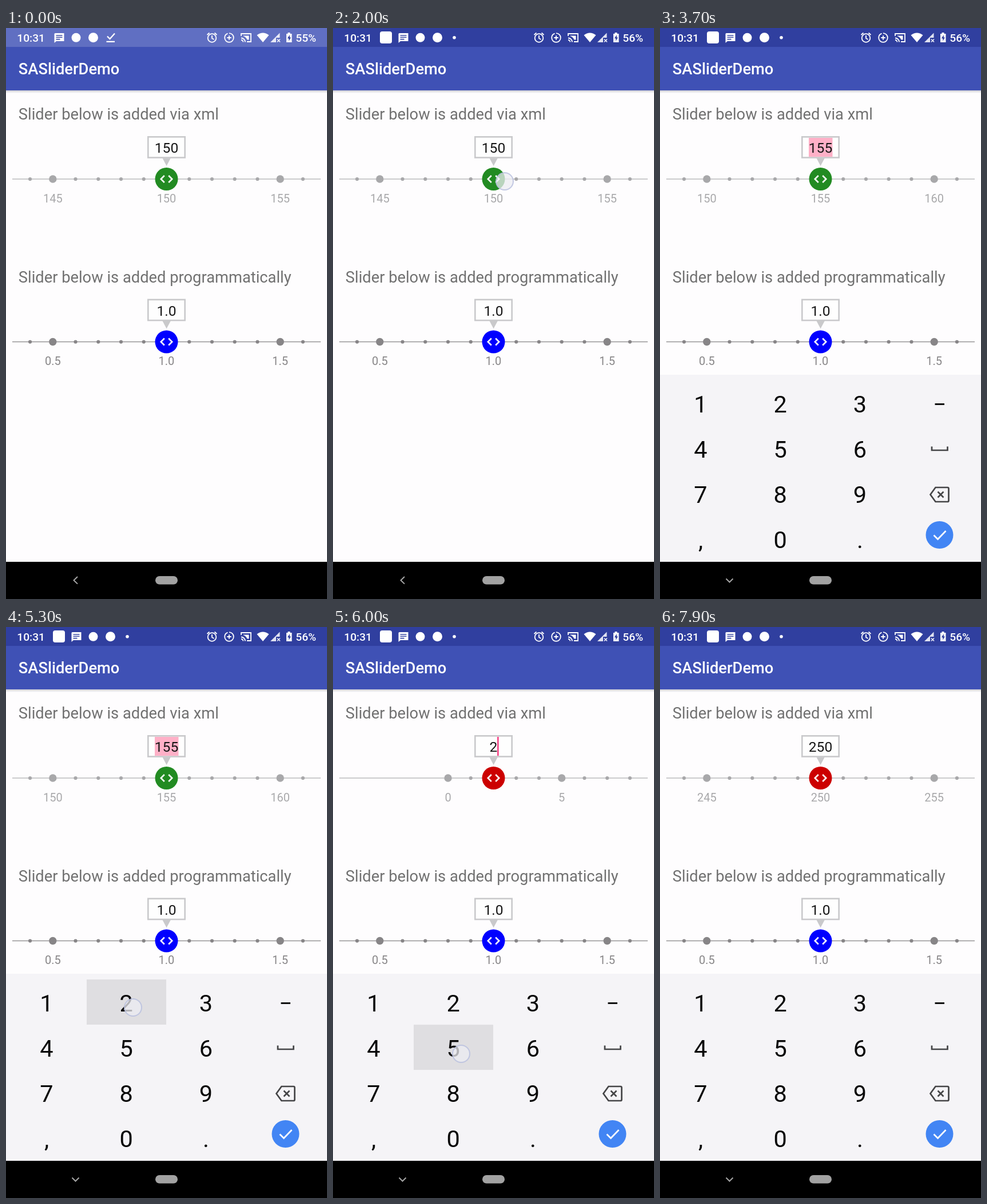
Recreate the animation shown at these times as an HTML page. Size 561 by 998 pixels, loop 8 s.

```html
<!DOCTYPE html>
<html lang="en">
<head>
<meta charset="utf-8">
<title>SASliderDemo</title>
<style>
  html, body { margin: 0; width: 100%; height: 100%; overflow: hidden; background: #fefdfe; }
  svg { display: block; width: 100%; height: 100%; }
  text { font-family: Roboto, sans-serif; white-space: pre; }
  .mid { text-anchor: middle; }
  .status { font-size: 19.2px; font-weight: 500; fill: #fff; }
  .title { font-size: 27.3px; font-weight: 500; fill: #fff; }
  .head { font-size: 27.3px; fill: #717171; }
  .label { font-size: 20px; }
  .value { font-size: 24.6px; fill: #161616; }
  .key { font-size: 41.5px; fill: #080808; }
  .line { fill: none; stroke: #fff; stroke-width: 1.8; }
</style>
</head>
<body>
<svg viewBox="0 0 561 998" preserveAspectRatio="none">
  <defs>
    <linearGradient id="shade" x2="0" y2="1">
      <stop stop-color="#cfcfd4"/><stop offset="1" stop-color="#fefdfe"/>
    </linearGradient>
    <clipPath id="track"><rect x="11" y="-80" width="539" height="130"/></clipPath>
    <clipPath id="screen"><rect width="561" height="933"/></clipPath>
  </defs>
  <rect width="561" height="998" fill="#fefdfe"/>
  <rect y="109" width="561" height="5" fill="url(#shade)"/>
  <rect y="32" width="561" height="77" fill="#3f51b5"/>
  <rect width="561" height="33" fill="#303f9f"/>
  <rect id="glow" width="561" height="33" fill="#606fc2"/>
  <text class="title" x="21.8" y="81">SASliderDemo</text>

  <text class="status" x="19.3" y="24">10:31</text>
  <rect id="note" x="82" y="6" width="21" height="21" rx="4" fill="#fff"/>
  <g id="icons">
    <path d="M86 9H101.500V23H88L84.500 26V10.500Q84.500 9 86 9Z" fill="#fff"/>
    <path d="M87.500 13H98.500M87.500 16.300H98.500M87.500 19.600H94.500" stroke="#3a49a5" stroke-width="1.6"/>
    <circle cx="122.500" cy="16.800" r="8" fill="#fff"/>
    <circle cx="152.500" cy="16.800" r="8.500" fill="#fff"/>
  </g>
  <path id="done" d="M177 14.500L181.500 19L190 9.500M175.500 23.800H190" class="line" style="stroke-width:2.3"/>
  <circle id="more" cx="212" cy="16.700" r="2.800" fill="#fff"/>

  <g class="line">
    <circle cx="360" cy="17.500" r="7.300"/>
    <path d="M360 13V18L363.500 20M351.500 12L355.500 8.500M368.500 12L364.500 8.500"/>
    <circle cx="390" cy="17" r="7.800" stroke-dasharray="34 2.500"/>
    <path d="M390 13.300V20.700M386.300 17H393.700"/>
    <path d="M411 14V10H428V24H421M411 17.500A7 7 0 0 1 418 24.500M411 21A3.500 3.500 0 0 1 414.500 24.500"/>
    <path d="M414.500 13.500H424.500V20.500H421.500Q419.500 15.500 414.500 14Z" fill="#fff" stroke="none"/>
  </g>
  <path d="M438.500 12.500Q449 4.500 459.500 12.500L449 25Z" fill="#fff"/>
  <path d="M462 25L478.500 8.500V17H472V25Z" fill="#fff" opacity=".85"/>
  <path d="M474 19.500L479 24.500M479 19.500L474 24.500" class="line" style="stroke-width:1.500"/>
  <path d="M490 10H492.500V8H496.500V10H499.500V25H490Z" fill="#fff"/>
  <path d="M495.800 12L491.800 18.200H494.300V22.800L498 16.600H495.800Z" fill="#303f9f"/>
  <text class="status" id="battery" x="506.300" y="24"></text>

  <text class="head" x="21.800" y="160">Slider below is added via xml</text>
  <text class="head" x="21.800" y="444.500">Slider below is added programmatically</text>
  <g id="top" transform="translate(0 264)"></g>
  <g id="low" transform="translate(0 548.500)"></g>

  <g clip-path="url(#screen)">
    <g id="board">
      <rect y="606" width="561" height="327" fill="#f5f4f7"/>
      <rect id="press" x="141" width="139" height="79" fill="#dfdee1"/>
      <g id="keys"></g>
      <rect x="480.500" y="656" width="16.500" height="3" fill="#111"/>
      <g fill="none" stroke="#454547" stroke-width="2.700">
        <path d="M475 731.500V738H502.500V731.500"/>
        <path d="M481.500 803H502.500Q504.500 803 504.500 805V826Q504.500 828 502.500 828H481.500L472.500 815.500Z"/>
        <path d="M485.500 810.500L495.500 820.500M495.500 810.500L485.500 820.500"/>
      </g>
      <circle cx="488.500" cy="886" r="24" fill="#4285f4"/>
      <path d="M478.500 886.500L485.500 893.500L499.500 879" class="line" style="stroke-width:2.700"/>
    </g>
  </g>

  <rect y="933" width="561" height="65" fill="#000"/>
  <path id="back" fill="none" stroke="#a6a6a6" stroke-width="2"/>
  <rect x="261" y="958" width="39" height="14.500" rx="7.200" fill="#a2a2a2"/>
  <circle id="touch" r="15" fill="#ececf1" fill-opacity=".75" stroke="#b9c0de" stroke-opacity=".85" stroke-width="2"/>
</svg>
<script>
const LOOP = 8000, STEP = 100, MID = 280.5, GAP = 39.74;
const $ = id => document.getElementById(id);
const show = (el, on) => el.setAttribute('visibility', on ? 'visible' : 'hidden');
const clamp = x => Math.max(0, Math.min(1, x));
const smooth = x => (1 - Math.cos(Math.PI * clamp(x))) / 2;
const within = (t, a, b) => t >= a && t < b;

function add(parent, tag, attrs, text) {
  const el = document.createElementNS('http://www.w3.org/2000/svg', tag);
  for (const k in attrs) el.setAttribute(k, attrs[k]);
  if (text !== undefined) el.textContent = text;
  parent.appendChild(el);
  return el;
}

// Local y = 0 is the track line; one tick is one unit of "pos".
function makeSlider(root, dot, line, width, format) {
  add(root, 'rect', { x: 11, y: -width / 2, width: 539, height: width, fill: line });
  const ticks = add(root, 'g', { 'clip-path': 'url(#track)' });
  add(root, 'rect', { x: 248.3, y: -73.7, width: 64.4, height: 36.2, fill: '#fefefe', stroke: '#c9c9cb', 'stroke-width': 2.6 });
  add(root, 'path', { d: 'M273.500 -36.500H287.800L280.600 -23Z', fill: '#c9c9cb' });
  const mark = add(root, 'rect', { x: 260, y: -72, width: 41.5, height: 33, fill: '#ffb0c7' });
  const value = add(root, 'text', { class: 'value mid', x: MID, y: -46 });
  const caret = add(root, 'rect', { y: -72, width: 2.5, height: 33, fill: '#f5397f' });
  const thumb = add(root, 'circle', { cx: MID, cy: 0, r: 20 });
  add(root, 'path', { d: 'M276.800 -6L270.800 0L276.800 6M284.200 -6L290.200 0L284.200 6', class: 'line', style: 'stroke-width:2.600' });
  let last;

  return ({ pos, text, color, selected = false, cursor = false }) => {
    value.textContent = text;
    thumb.setAttribute('fill', color);
    show(mark, selected);
    show(caret, cursor);
    caret.setAttribute('x', MID + 6.9 * text.length - 0.3);
    if (pos === last) return;
    last = pos;
    ticks.replaceChildren();
    for (let n = Math.max(0, Math.ceil(pos - 7.4)); n <= pos + 7.4; n++) {
      const x = MID + (n - pos) * GAP, big = n % 5 === 0;
      if (x > 12 && x < 549) add(ticks, 'circle', { cx: x, cy: 0, r: big ? 6.7 : 3.1, fill: dot });
      if (big) add(ticks, 'text', { class: 'label mid', x, y: 40.5, fill: dot }, format(n));
    }
  };
}

const drawTop = makeSlider($('top'), '#a8a8aa', '#c6c6c8', 1.8, String);
const drawLow = makeSlider($('low'), '#878587', '#8f8d8f', 1.4, n => (n / 10).toFixed(1));
drawLow({ pos: 10, text: '1.0', color: '#0000ff' });

['123', '456', '789', ',0.'].forEach((row, r) =>
  [...row].forEach((ch, c) =>
    add($('keys'), 'text', { class: 'key mid', x: 71 + 139.2 * c, y: 671.5 + 79.2 * r }, ch)));

// Entries: time, text typed, slider start, slider end
const typed = [[5500, '2', 155, 2], [6100, '25', 2, 25], [7400, '250', 25, 250]];
// Taps: from, to, x, y, key row (-1 for none)
const taps = [
  [3200, 3400, 284, 213, -1],
  [5300, 5500, 222, 665, 0],
  [5900, 6100, 224, 746, 1],
  [7200, 7400, 222, 901, 3]
];

function topState(t) {
  const entry = typed.filter(e => t >= e[0]).pop();
  if (entry) {
    const [at, text, from, to] = entry;
    return {
      text, color: '#cc0000',
      pos: from + (to - from) * smooth((t - at + 50) / 400),
      cursor: within(t, 5500, 6600) || within(t, 7000, 7900)
    };
  }
  const pos = 150 + 5 * smooth((t - 2000) / 500);
  return { pos, text: String(Math.round(pos)), color: '#228b22', selected: t >= 3400 };
}

function render(t) {
  const k = clamp(t / 400);
  $('glow').setAttribute('opacity', 1 - k);
  $('note').setAttribute('opacity', k);
  $('more').setAttribute('opacity', k);
  $('done').setAttribute('opacity', 1 - k);
  $('icons').setAttribute('transform', `translate(${30 * k} 0)`);
  $('battery').textContent = t < 2000 ? '55%' : '56%';

  const state = topState(t);
  drawTop(state);

  const up = t >= 3400;
  const rise = 1 - (1 - clamp((t - 3300) / 400)) ** 2;
  show($('board'), up);
  $('board').setAttribute('transform', `translate(0 ${327 * (1 - rise)})`);
  $('back').setAttribute('d', up ? 'M115.500 962.500L121.500 968.500L127.500 962.500' : 'M125 959L118.500 965.300L125 971.600');

  const tap = taps.find(p => within(t, p[0], p[1]));
  const drag = within(t, 2000, 2600);
  show($('touch'), tap || drag);
  if (tap || drag) {
    $('touch').setAttribute('cx', tap ? tap[2] : 300 - (state.pos - 150) * GAP);
    $('touch').setAttribute('cy', tap ? tap[3] : 268);
  }
  const pressed = tap && tap[4] >= 0;
  show($('press'), pressed);
  if (pressed) $('press').setAttribute('y', 616 + 79.1 * tap[4]);
}

const start = performance.now();
function tick() {
  const t = (performance.now() - start) % LOOP;
  render(Math.floor(t / STEP) * STEP);
  requestAnimationFrame(tick);
}
tick();
</script>
</body>
</html>
```
